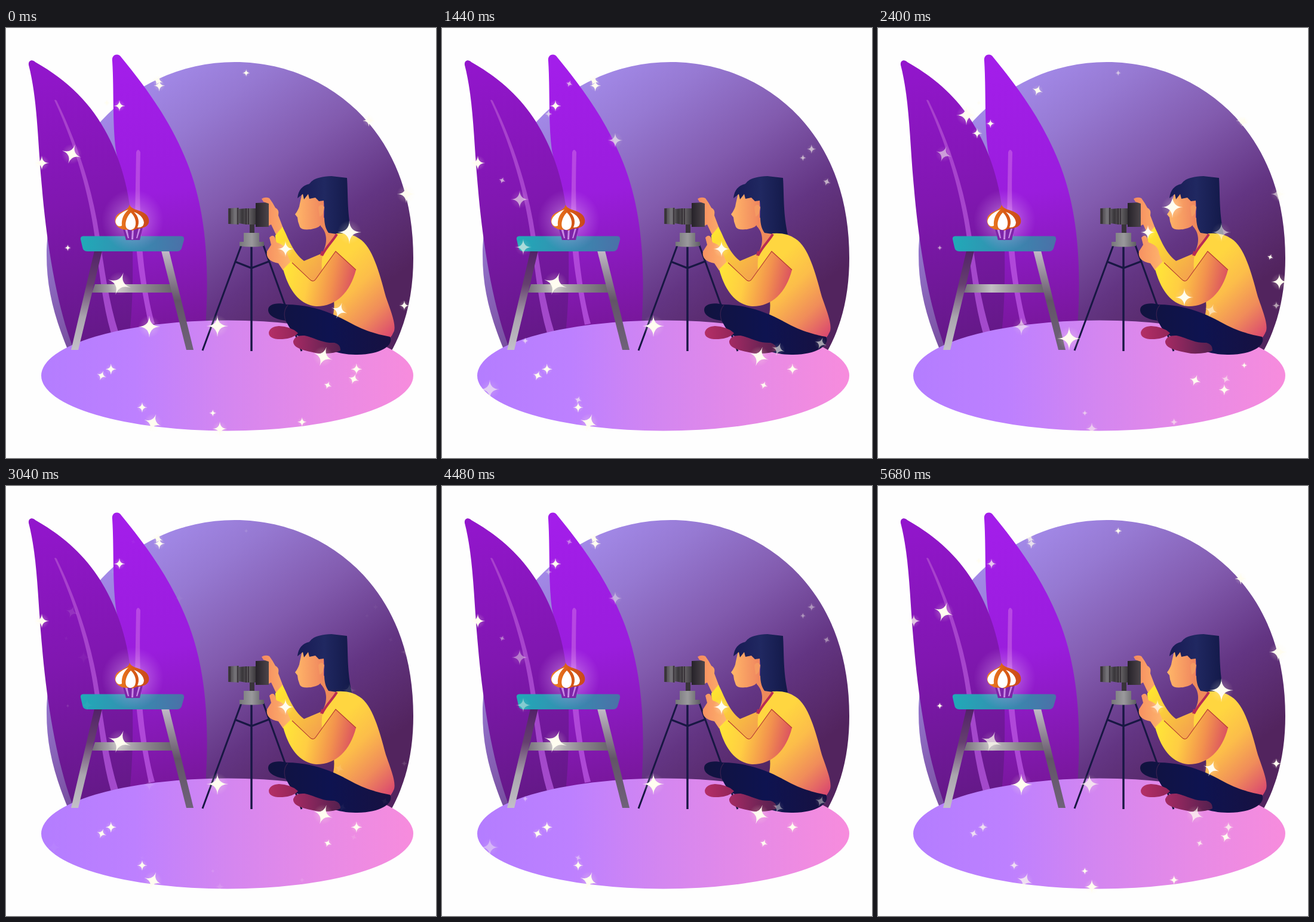
Write an HTML page that moves like this. It is 720 by 720 pixels and loops after 5760 ms.

```html
<!DOCTYPE html>
<html lang="en">
<head>
<meta charset="utf-8">
<title>Photo shoot</title>
<style>
html, body { margin: 0; width: 100%; height: 100%; overflow: hidden; background: #fefefe; }
svg { display: block; width: 100vw; height: 100vh; }
</style>
</head>
<body>
<svg viewBox="0 0 720 720" xmlns="http://www.w3.org/2000/svg">
<defs id="defs">
  <radialGradient id="halo">
    <stop offset="0" stop-color="#fff"/>
    <stop offset=".12" stop-color="#fff" stop-opacity=".75"/>
    <stop offset=".35" stop-color="#fffbe8" stop-opacity=".2"/>
    <stop offset="1" stop-color="#fff6cf" stop-opacity="0"/>
  </radialGradient>
  <radialGradient id="shine">
    <stop offset="0" stop-color="#ffe9ff" stop-opacity=".6"/>
    <stop offset=".5" stop-color="#f3c4ff" stop-opacity=".25"/>
    <stop offset="1" stop-color="#e0a0ff" stop-opacity="0"/>
  </radialGradient>
  <path id="star" d="M0-1Q.02-.02 1 0Q.02.02 0 1Q-.02.02-1 0Q-.02-.02 0-1Z"/>
</defs>

<!-- backdrop -->
<path fill="url(#wall)" d="M104 540C80 482 68 435 68 380C68 290 110 210 160 155C220 90 300 57 383 57C478 57 558 100 608 160C660 222 682 300 682 385C682 440 672 495 643 545Z"/>

<!-- leaves -->
<path fill="url(#leafB)" d="M178 56C176 44 188 41 193 49C240 106 275 158 299 215C328 282 343 370 334 500L195 520C208 400 205 300 184 205C178 160 181 105 178 56Z"/>
<path fill="url(#veinB)" d="M218 208Q221 200 225 208C223 280 224 350 234 420Q240 465 249 495L239 497C228 440 217 390 216 320Z"/>
<path fill="url(#leafF)" d="M38 62C37 54 44 52 49 57C104 88 144 128 170 179C200 236 212 300 212 370C213 430 211 480 206 520L112 535C84 460 68 360 60 265C53 190 53 120 38 62Z"/>
<path fill="url(#veinF)" d="M81 121Q83 119 85 122C118 190 144 265 156 345C164 400 172 460 189 512L178 518C163 470 157 415 150 360C139 272 113 190 81 121Z"/>

<ellipse cx="370.5" cy="582" rx="311.5" ry="92.5" fill="url(#floor)"/>

<!-- stool -->
<path fill="url(#bar)" d="M149 429H275L280 443H144Z"/>
<path fill="url(#legL)" d="M148 373H161L121 539H109Z"/>
<path fill="url(#legR)" d="M260 373H273L314 539H302Z"/>
<path fill="url(#seat)" d="M129 348.5H294Q299 349 298 355L294 369Q292 374 286 374H136Q129 374 128 367L125 354Q124 349 129 348.5Z"/>

<!-- cupcake -->
<circle cx="212" cy="322" r="52" fill="url(#shine)"/>
<path fill="#7d25a8" d="M195 334H229L224 355H201Z"/>
<path fill="#c98be6" d="M199 336H203L206 352H204ZM211 336H214L213 354H210ZM222 336H225L220 352H218Z"/>
<path fill="url(#cake)" d="M207 296C210 304 221 304 230 309C240 314 242 326 236 331C230 337 221 334 212 339C204 336 197 340 191 335C181 331 180 318 187 312C194 306 205 305 207 296Z"/>
<path fill="#fff" d="M205 304C191 309 181 319 184 327C186 332 190 333 194 331C193 320 197 311 205 304ZM209 309C200 318 198 332 203 336Q209 341 215 335C220 327 216 315 209 309ZM214 308C222 315 224 325 220 334Q230 335 231 326C230 317 223 311 214 308Z"/>

<!-- tripod and camera -->
<g fill="none" stroke="#181743" stroke-width="3.4">
  <path d="M394 364L329 540M431 364L495 541" stroke-width="3"/>
  <path d="M411 364V541M383 391L411 402L440 391"/>
</g>
<path fill="#39343b" d="M408 328H416V346H408Z"/>
<path fill="url(#metal)" d="M398 343H424V358H432V365Q411 368 391 365V358H398Z"/>
<path fill="url(#lens)" d="M372 302L390 301V303L402 302H419V329H402L390 327V329L372 328Z"/>
<path fill="none" stroke="#282329" stroke-width="1.3" d="M375 302V328M388 301V329M402 302V329M406 302V329"/>
<path fill="url(#body)" d="M418 293L440 292V333H418Z"/>

<!-- far arm -->
<path fill="url(#hand)" d="M428 286Q434 282 441 285Q447 293 451 301Q458 304 456 314L464 335L452 346L444 329L440 331V294L431 291Z"/>
<path fill="url(#sleeve)" d="M463 333C472 350 480 376 499 390L530 377L534 414L510 426L477 397C462 382 450 365 451 347Z"/>

<!-- head -->
<path fill="#ee8a5b" d="M526 315L550 325L556 346L529 381L531 374C540 357 536 340 527 332Z"/>
<path fill="url(#skin)" d="M496 276L532 272V324Q526 335 511 337Q495 339 492 333L489 324L488 317L484 312Q491 303 492 294Z"/>
<path fill="url(#hair)" d="M488 285Q490 265 508 261Q515 249 545 248L571 251C573 284 571 309 579 346Q560 347 540 343C528 326 536 306 532 289L524 290L518 284L508 286L506 278L499 287L497 278Z"/>
<path fill="#f49a62" d="M523 300Q528 292 533 300Q532 313 525 316Z"/>

<!-- torso, legs -->
<path fill="url(#shirt)" d="M553 344Q577 342 592 353C613 366 625 408 636 450C644 473 653 495 650 507Q647 515 642 520C610 518 578 500 548 480Q551 465 548 448C530 430 526 404 530 380Z"/>
<path fill="none" stroke="#b72c54" stroke-width="4" d="M554 345C548 356 537 365 529 381M528 381L530 374"/>
<path fill="url(#pants)" d="M439 472C439 462 454 459 470 463C510 463 545 476 575 493Q607 511 643 517C649 527 636 546 588 547C548 548 522 530 488 515C474 505 473 497 468 490C452 488 439 482 439 472Z"/>
<path fill="none" stroke="#35204f" stroke-width="1.3" d="M472 464Q463 474 468 490"/>
<path fill="url(#shoeL)" d="M440 510Q442 500 457 499Q478 500 489 511Q481 520 463 521Q440 522 440 510Z"/>
<path fill="url(#shoeR)" d="M481 524Q484 514 500 515C518 519 530 528 550 527Q561 530 560 540Q550 546 524 545C498 540 480 536 481 524Z"/>

<!-- near arm -->
<path fill="url(#hand)" d="M441 351Q446 345 450 350L453 359Q470 364 471 379L477 393L464 406L456 394Q434 390 437 374L444 363Z"/>
<path fill="url(#arm)" d="M477 391L510 420Q515 426 519 420L552 374L586 405C576 443 553 466 520 466C492 464 474 440 464 404Z"/>
<path fill="none" stroke="#b83d35" stroke-width="1.2" d="M479 393L510 422Q515 426 519 420L552 374L586 405"/>

<g id="sparks"></g>
</svg>

<script>
const NS = 'http://www.w3.org/2000/svg';
const LOOP = 5760, STEP = 80, CYCLES = 4, SMALL = 8;
const $ = id => document.getElementById(id);

function add(parent, tag, attrs) {
  const el = document.createElementNS(NS, tag);
  for (const k in attrs) el.setAttribute(k, attrs[k]);
  return parent.appendChild(el);
}

// stops are evenly spaced colours
function grad(id, x1, y1, x2, y2, ...colours) {
  const g = add($('defs'), 'linearGradient', { id, x1, y1, x2, y2, gradientUnits: 'userSpaceOnUse' });
  colours.forEach((c, i) => add(g, 'stop', { offset: i / (colours.length - 1), 'stop-color': c }));
}
const across = (id, a, b, ...colours) => grad(id, a, 0, b, 0, ...colours);
const down = (id, a, b, ...colours) => grad(id, 0, a, 0, b, ...colours);

grad('wall', 190, 80, 510, 520, '#a78ff0', '#9679d2', '#825bae', '#633583', '#52245e');
grad('leafB', 210, 50, 290, 500, '#a31eea', '#9a1ddd', '#78179b');
grad('leafF', 70, 60, 170, 520, '#9216cc', '#8017b0', '#641987');
down('veinB', 205, 495, '#b847e4', '#ac48d4');
down('veinF', 120, 515, '#a840cd', '#a34acb');
across('floor', 60, 682, '#b47dff', '#bd80ff', '#d486f0', '#e78ae6', '#f78cdd');
across('seat', 125, 298, '#20aab8', '#4b70a8');
across('bar', 145, 280, '#77717b', '#c2bec3', '#8b858d', '#68636b');
down('legL', 374, 539, '#532169', '#65406f', '#aaa5ae', '#c3c0c8');
down('legR', 374, 539, '#c1b9c6', '#625467', '#6f6279');
across('cake', 184, 240, '#ef8124', '#d95c15', '#c9471d');
across('metal', 391, 432, '#77777a', '#9a999c', '#5f5e63');
across('lens', 372, 419, '#3b373b', '#77757a', '#39363a', '#615e61', '#39363a');
across('body', 418, 440, '#262229', '#4c454a');
across('hand', 430, 480, '#f58b60', '#ffb86d');
grad('sleeve', 451, 345, 530, 410, '#ffe72f', '#f4a14e');
across('skin', 486, 532, '#ffb568', '#ef855e');
across('hair', 489, 577, '#181b55', '#202861', '#131949');
grad('shirt', 560, 390, 665, 500, '#ffd640', '#fcbd4a', '#f08c5a', '#d94570');
across('pants', 440, 645, '#11133f', '#0e1350', '#171141');
across('shoeL', 440, 489, '#b42f67', '#922458');
across('shoeR', 481, 560, '#a52a63', '#54204f');
grad('arm', 468, 405, 586, 430, '#ffe438', '#ffcd43', '#f2914e', '#d84a62');

let seed = 7;
const rand = () => (seed = seed * 16807 % 2147483647) / 2147483647;

const sparks = [];
function spark(x, y, size, peak) {
  const el = add($('sparks'), 'g', {});
  add(el, 'circle', { r: 1, fill: 'url(#halo)' });
  add(el, 'use', { href: '#star', fill: '#fffdf0' });
  sparks.push({ el, x, y, size, tilt: rand() < .3 ? 20 : 0, peak });
}

// four groups of sparkles, each lit for half a cycle around its peak;
// the bright ones sit at fixed spots, the small ones along the outline
const bright = [
  [[190, 428], [354, 499], [531, 550], [246, 661], [468, 370], [60, 226]],
  [[80, 605], [130, 287], [136, 367], [290, 188], [563, 538], [634, 528]],
  [[320, 520], [493, 300], [148, 146], [513, 451], [672, 425], [452, 342]],
  [[575, 342], [240, 500], [110, 211], [670, 278], [558, 473], [358, 671]]
];
bright.forEach((spots, i) => {
  const peak = .1 + i * .26;
  spots.forEach(([x, y], j) => spark(x, y, 20 - j * 1.5, peak));
  for (let j = 0; j < SMALL; j++) {
    const a = rand() * Math.PI * 2, r = 270 + 50 * rand();
    spark(375 + r * Math.cos(a), 365 + r * Math.sin(a), 5 + 5 * rand(), peak);
  }
});

// steady twinkle with a lead that fades over the loop
function phaseAt(t) {
  return (CYCLES * t + .25 * (1 - t) * Math.sin(2 * Math.PI * t) ** 2) % 1;
}

function draw(ms) {
  const phase = phaseAt(Math.floor((ms % LOOP) / STEP) * STEP / LOOP);
  for (const s of sparks) {
    const gap = Math.abs(phase - s.peak);
    const near = Math.min(gap, 1 - gap) / .25;
    const glow = Math.max(0, Math.min(1, 2 * (1 - near)));
    const size = s.size * (.55 + .45 * glow);
    s.el.setAttribute('opacity', glow.toFixed(3));
    s.el.setAttribute('transform', `translate(${s.x} ${s.y}) rotate(${s.tilt}) scale(${size})`);
  }
}

const start = performance.now();
function tick() {
  draw(performance.now() - start);
  requestAnimationFrame(tick);
}
draw(0);
requestAnimationFrame(tick);
</script>
</body>
</html>
```
